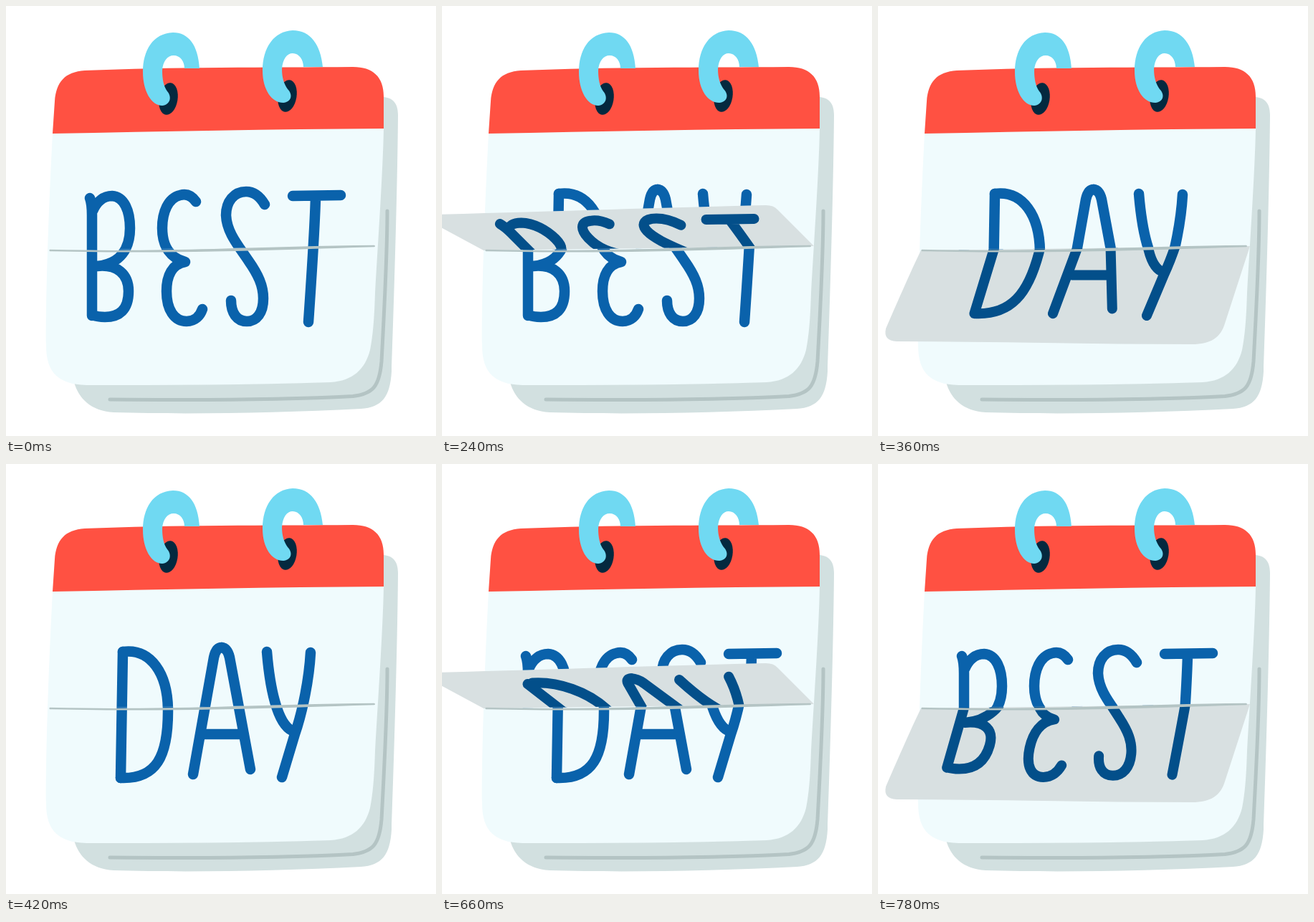
An HTML page with a canvas for the animation above (0.84 s loop, 600 px wide and 600 px high).

```html
<!DOCTYPE html>
<html lang="en">
<head>
<meta charset="utf-8">
<title>Best day calendar</title>
<style>
  html, body { margin: 0; width: 100%; height: 100%; overflow: hidden; background: #fff; }
  canvas { display: block; width: 100vmin; height: 100vmin; }
</style>
</head>
<body>
<canvas id="stage" width="600" height="600"></canvas>
<script>
const ctx = document.getElementById('stage').getContext('2d');
const STEP = 60, STEPS = 14;
const INK = '#0a62ab', INK_SHADED = '#034f8a', PAPER = '#f0fbfd', FLAP = '#d8e0e1';

// The fold is a slightly tilted line across the page.
const FOLD_Y = 341.8, FOLD_TILT = -0.0133;
const foldAt = x => FOLD_Y + FOLD_TILT * x;

const paths = list => list.map(d => new Path2D(d));

const WORDS = {
  best: paths([
    'M117 268 Q120 276 120 292 L120 432 M121 286 C127 272 137 265 148 265 C165 266 173 286 173 310 C173 338 160 360 127 363 C155 360 171 374 171 398 C171 424 158 434 138 434 Q128 434 120 431',
    'M265 273 C258 263 250 262 243 264 C226 268 218 288 218 310 C218 336 230 352 250 357 C232 360 224 376 224 398 C224 424 235 440 252 440 C264 440 271 432 274 423',
    'M361 277 C354 265 346 259 335 259 C318 259 307 273 307 292 C308 316 324 334 338 355 C352 375 359 390 359 408 C359 428 350 440 336 440 C322 440 314 428 314 411',
    'M400 265 L467 264 M432 266 Q431 310 422 441'
  ]),
  day: paths([
    'M163 262 L160 438',
    'M163 262 C202 257 226 292 226 345 C226 408 210 440 160 438',
    'M261 433 L290 270 Q293 256 301 256',
    'M301 256 Q309 257 312 270 L341 426 M277 377 L328 377',
    'M364 262 C368 310 378 362 399 372',
    'M425 263 C423 300 414 345 403 377 L385 437'
  ])
};

const FLAPS = [
  { up: true,  shape: 'M58 341 L2 243 Q0 237 8 236.5 C160 232 310 227 459 223 Q467 223 470 229 L519 335 Z' },
  { up: true,  shape: 'M58 341 L-22 298 Q-25 292 -14 291 C150 287 310 281 452 278 Q463 278 468 284 L519 335 Z' },
  { up: false, shape: 'M60 341 Q30 352 -8 367 L-8 382 C150 386 300 393 445 394 C475 394 490 376 519 335 Z' },
  { up: false, shape: 'M60 341 C46 369 22 425 11 450 Q7 467 26 468 C160 468 300 472 438 472 C464 472 478 463 484 443 L519 335 Z' }
].map(f => ({ up: f.up, shape: new Path2D(f.shape) }));

// Per flap position, per letter part: [sideways lean, vertical scale].
const LEANS = {
  best: [
    [[.34, 1.15], [.38, 1.18], [.42, 1.11], [.44, 1.18]],
    [[.5, .5], [.48, .52], [.46, .52], [.44, .54]],
    [[.35, .26], [.34, .31], [.4, .32], [.24, .33]],
    [[.26, .91], [.21, .97], [.08, .95], [.11, .93]]
  ],
  day: [
    [[.5, .9], [.38, .95], [.37, .98], [.37, .98], [.39, 1.04], [.25, 1.16]],
    [[.56, .42], [.48, .44], [.45, .47], [.45, .47], [.44, .48], [.34, .54]],
    [[.285, .25], [.26, .26], [.09, .33], [.23, .38], [.04, .38], [.02, .38]],
    [[.26, .91], [.24, .91], [.18, .96], [.16, .96], [.1, .95], [.1, .95]]
  ]
};

const HEADER_TOP = 'M65 178 L68 133 C70 106 82 92 110 90 C230 85 370 86 484 85 C512 85 527 99 527 126 L527 171 ';
const HEADER = new Path2D(HEADER_TOP + 'C370 172 220 175 65 178 Z');
const PAGE = new Path2D(HEADER_TOP + 'C526 230 519 330 515 400 C514 435 512 460 508 480 C501 507 484 523 453 525 C340 529 220 529 112 529 C72 528 56 510 56 474 C55 410 60 270 65 178 Z');
const BACK_PAGE = new Path2D('M522 127 C539 126 547 135 547 152 C546 270 541 420 538 510 C536 545 525 560 495 562 C380 568 250 570 150 567 C118 565 101 547 95 525 L500 500 Z');
const BACK_CREASE = new Path2D('M532 286 C532 350 527 440 524 496 C521 531 512 541 484 544.5 C380 550 250 550 145 549');
const FOLD = new Path2D('M61 339.8 C150 342 220 340.5 290 339 C370 336.5 440 334.5 514 333.8 Q516 335.2 514 336.2 C440 338.5 370 341 290 342.4 C220 343.8 150 344 61 342.2 Q59.5 341 61 339.8 Z');
const RINGS = [
  { hole: [226.5, 129.5], shape: new Path2D('M270 87 C268 55 255 37 233 37 C205 38 191 62 191 92 C191 119 203 139 218 139 C229 138 232 127 225 119 C220 112 218 102 218 90 C219 77 225 69 234 69 C243 69 249 77 249 87 Z') },
  { hole: [392.5, 125.5], shape: new Path2D('M442 85 C439 54 425 34 400 34 C374 35 358 58 358 90 C358 117 371 135 387 135 C398 134 401 124 393 116 C388 109 385 100 385 88 C386 74 392 66 400 66 C409 66 415 75 415 85 Z') }
];

function fill(path, color) {
  ctx.fillStyle = color;
  ctx.fill(path);
}

function strokePath(path, color, width) {
  ctx.strokeStyle = color;
  ctx.lineWidth = width;
  ctx.stroke(path);
}

function clipHalf(up) {
  const edge = up ? 0 : 600;
  ctx.beginPath();
  ctx.moveTo(0, foldAt(0));
  ctx.lineTo(600, foldAt(600));
  ctx.lineTo(600, edge);
  ctx.lineTo(0, edge);
  ctx.clip();
}

function drawHalf(word, up) {
  ctx.save();
  clipHalf(up);
  WORDS[word].forEach(part => strokePath(part, INK, 14.5));
  ctx.restore();
}

// Keeps the fold in place and leans everything else to the left.
function leanMatrix(up, [lean, scale]) {
  const k = up ? lean : -lean;
  return new DOMMatrix([
    1 - k * FOLD_TILT, FOLD_TILT * (1 - scale),
    k, scale,
    -k * FOLD_Y, FOLD_Y * (1 - scale)
  ]);
}

function drawFlap(index, word) {
  const { up, shape } = FLAPS[index];
  fill(shape, FLAP);
  ctx.save();
  clipHalf(up);
  WORDS[word].forEach((part, i) => {
    const leaning = new Path2D();
    leaning.addPath(part, leanMatrix(up, LEANS[word][index][i]));
    strokePath(leaning, INK_SHADED, 14);
  });
  ctx.restore();
}

function drawCalendar() {
  fill(BACK_PAGE, '#d2e0e0');
  strokePath(BACK_CREASE, '#b4c4c4', 5);
  fill(PAGE, PAPER);
  fill(HEADER, '#ff5142');
  for (const { hole, shape } of RINGS) {
    ctx.beginPath();
    ctx.ellipse(...hole, 13, 22.5, 0.16, 0, Math.PI * 2);
    ctx.fillStyle = '#04293f';
    ctx.fill();
    fill(shape, '#70d9f2');
  }
}

function draw(time) {
  const step = Math.floor(time / STEP) % STEPS;
  const [from, to] = step < 7 ? ['best', 'day'] : ['day', 'best'];
  const flap = step % 7 - 3;
  const flipping = flap >= 0;

  ctx.fillStyle = '#fff';
  ctx.fillRect(0, 0, 600, 600);
  ctx.lineCap = ctx.lineJoin = 'round';
  drawCalendar();
  drawHalf(flipping ? to : from, true);
  drawHalf(from, false);
  if (flipping) drawFlap(flap, FLAPS[flap].up ? from : to);
  fill(FOLD, '#b4c4c4');
}

const start = performance.now();
function tick() {
  draw(performance.now() - start);
  requestAnimationFrame(tick);
}
tick();
</script>
</body>
</html>
```
